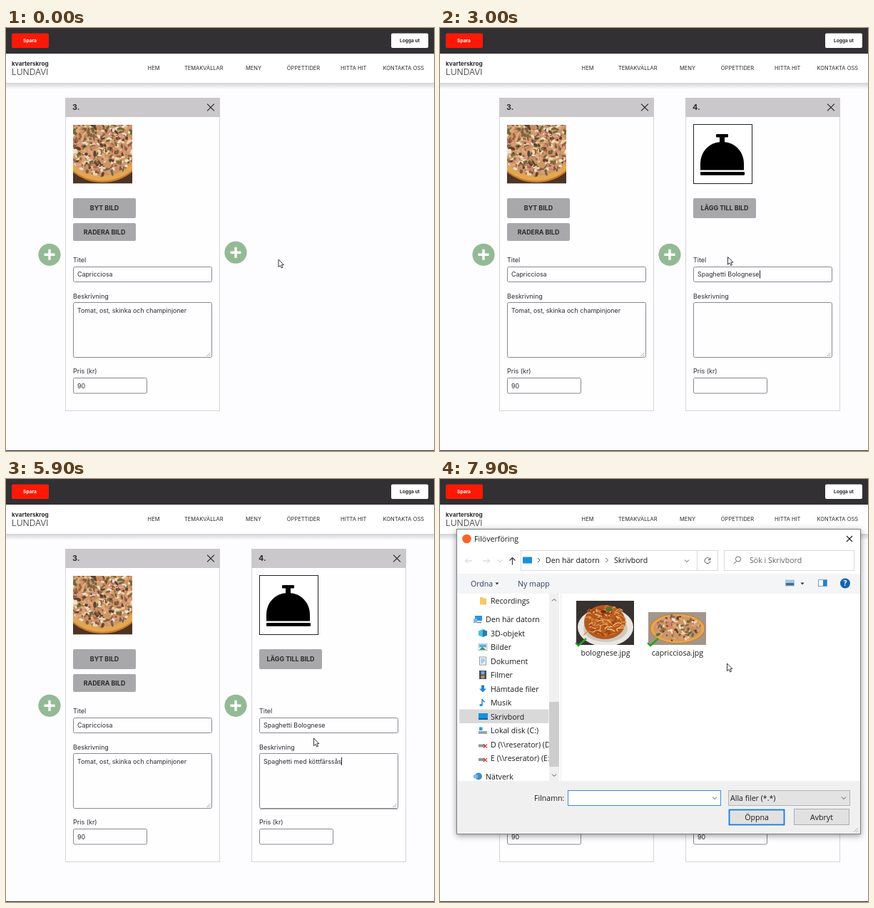
These frames come from a looping animation (600 by 594 pixels, 8 s). An HTML page:

```html
<!DOCTYPE html>
<html lang="sv">
<head>
<meta charset="utf-8">
<style>
  html, body { margin: 0; width: 100%; height: 100%; overflow: hidden; background: #fdfcfe; }
  svg { display: block; }
  text { font: 8.85px Inter, sans-serif; fill: #2b2a2e; white-space: pre; }
  .label { font-size: 9px; }
  .nav { font-size: 7.5px; }
  .button { font-size: 8.9px; font-weight: 700; }
  .small { font-size: 6.6px; font-weight: 700; }
  .number { font-size: 10.8px; font-weight: 700; }
  .win { font: 10.6px "Open Sans", sans-serif; fill: #1c1c1c; }
  .mid { text-anchor: middle; }
  .lift { filter: drop-shadow(0 4px 4px rgba(0,0,0,.28)); }
  .dialog { filter: drop-shadow(0 2px 4px rgba(0,0,0,.4)); }
</style>
</head>
<body>
<svg id="stage" width="600" height="594" viewBox="0 0 600 594"></svg>
<script>
const LOOP = 8000;
const stage = document.getElementById('stage');
const $ = id => document.getElementById(id);

let seed = 7;
const rnd = (a = 1, b = 0) => {
  seed = (seed * 16807) % 2147483647;
  return b + (a - b) * seed / 2147483647;
};

const rect = (x, y, w, h, fill, extra = '') =>
  `<rect x="${x}" y="${y}" width="${w}" height="${h}" fill="${fill}" ${extra}/>`;
const box = (x, y, w, h, stroke, fill = '#fff', rx = 0) =>
  rect(x + .5, y + .5, w - 1, h - 1, fill, `stroke="${stroke}" rx="${rx}"`);
const text = (x, y, s, cls = '', extra = '') =>
  `<text x="${x}" y="${y}" class="${cls}" ${extra}>${s}</text>`;
const line = (d, color, width = 1) =>
  `<path d="${d}" fill="none" stroke="${color}" stroke-width="${width}"/>`;
const shape = (d, fill) => `<path d="${d}" fill="${fill}"/>`;
const ellipse = (x, y, rx, ry, fill, extra = '') =>
  `<ellipse cx="${x}" cy="${y}" rx="${rx}" ry="${ry}" fill="${fill}" ${extra}/>`;
const cross = (x, y, r, color) =>
  line(`M${x - r} ${y - r}l${2 * r} ${2 * r}m0 ${-2 * r}l${-2 * r} ${2 * r}`, color, 1.1);
const chevron = (x, y, turn, color = '#555') =>
  `<g transform="translate(${x} ${y}) rotate(${turn})">${line('M-3 -1.5L0 1.5L3 -1.5', color)}</g>`;
const triangle = (x, y) => shape(`M${x - 2.5} ${y - 1.5}h5l-2.5 3z`, '#333');

function photo(x, y, w, h, back, content) {
  return `<svg x="${x}" y="${y}" width="${w}" height="${h}" viewBox="0 0 ${w} ${h}">
    ${rect(0, 0, w, h, back)}${content}</svg>`;
}

function pizza(cx, cy, rx, ry, count, size) {
  const tones = ['#ecd3b0', '#5d4030', '#cf8468', '#f1e1cb', '#9c6244', '#dcae78', '#7d5d49', '#d99a80', '#6d6a3a'];
  let s = ellipse(cx, cy, rx, ry, '#c47a2c') + ellipse(cx, cy, rx * .97, ry * .96, '#e3a652') +
    ellipse(cx, cy, rx * .86, ry * .83, '#cd9663');
  for (let i = 0; i < count; i++) {
    const a = rnd(6.28), r = Math.sqrt(rnd()) * .82;
    const px = cx + Math.cos(a) * r * rx, py = cy + Math.sin(a) * r * ry;
    s += ellipse(px, py, rnd(size, size / 3), rnd(size / 2, size / 4), tones[i % tones.length],
      `transform="rotate(${rnd(180)} ${px} ${py})"`);
  }
  return s;
}

function pasta() {
  const tones = ['#c96a24', '#eaa75a', '#8f3a16', '#f3c27c', '#d98238'];
  let s = ellipse(41, 37, 39, 27, '#e9e6e1') + ellipse(41, 39, 31, 19, '#cfc8bf') + ellipse(40, 30, 29, 24, '#b4581f');
  for (let i = 0; i < 90; i++) {
    const a = rnd(6.28), r = Math.sqrt(rnd()) * 21;
    s += line(`M${40 + Math.cos(a) * r * 1.2} ${30 + Math.sin(a) * r}q${rnd(9, -9)} ${rnd(-8)} ${rnd(13, -13)} ${rnd(5, -5)}`,
      tones[i % tones.length], 1.3);
  }
  return s + ellipse(46, 12, 5, 3, '#55702c') + ellipse(38, 15, 4, 2, '#6b2a14');
}

const bell = box(94, 135, 83, 84, '#222') +
  rect(126, 149, 17, 4.5, '#000', 'rx="1"') + rect(131, 152, 7, 9, '#000') +
  shape('M104 199.5V191C104 173 117 160 134.5 160S165 173 165 191V199.5z', '#000') +
  rect(104, 202, 62, 4.7, '#000', 'rx="1"');

const button = (y, h, label) =>
  rect(94, y, 88, h, '#a8a7a9', 'rx="2"') + text(138, y + h / 2 + 3.2, label, 'button mid');
const field = (y, w, h) => box(94, y, w, h, '#89888e', '#fefdff', 2);
const plus = (x, id) => `<g id="${id}" transform="translate(${x} 318.3)">
  ${ellipse(0, 0, 15.6, 15.6, '#93ba95')}${line('M-7.5 0H7.5M0 -7.5V7.5', '#fff', 3.4)}</g>`;

const card = (number, picture, buttons) =>
  box(83, 98, 217, 440, '#d6d4da', '#fefdff') + rect(83, 98, 217, 27, '#cac8cb') +
  text(93, 115.3, number, 'number') + cross(287, 111.5, 4.9, '#222') + picture + buttons +
  text(94, 329, 'Titel', 'label') + field(335, 195, 22) +
  text(94, 379.7, 'Beskrivning', 'label') + field(385, 195, 78) +
  line('M281.5 461l5 -5M284.5 461l2 -2', '#888', .8) +
  text(94, 485.2, 'Pris (kr)', 'label') + field(491, 104, 22.5);

// Each icon fills about 12 by 10 pixels around the middle of its left edge
const icons = {
  folder: () => shape('M2 -5h4l1 1.5h4v9h-9z', '#f3c969'),
  computer: () => rect(2, -5, 10, 7, '#2f93dc') + rect(0, -1, 5, 6, '#7fb9e4') + rect(5, 4, 6, 1.2, '#6a7c88'),
  cube: () => shape('M0 -3l6 -2.5v11l-6 -2.5z', '#48bde0') + shape('M6 -5.5l6 2.5v6l-6 2.5z', '#1c7fae'),
  picture: () => rect(0, -4.5, 12, 9.5, '#fff', 'stroke="#9ab" stroke-width=".7"') + rect(1, -3.5, 10, 4, '#58aee4') + shape('M1 4l4 -4l6 4z', '#3f8a64'),
  paper: () => box(1, -6, 10, 12, '#8a9aa6') + line('M3 -2.5h6m-6 2.5h6m-6 2.5h4', '#4b86b4'),
  film: () => rect(1, -6, 10, 12, '#444b55') + rect(3.5, -5, 5, 4.5, '#6fa6d4') + rect(3.5, .8, 5, 4.5, '#b98a5c'),
  download: () => shape('M4 -5h4v5h3l-5 5l-5 -5h3z', '#1f86d8'),
  note: () => line('M5 3v-8q1 3 4 4', '#2a8ee0', 1.5) + ellipse(3.6, 3.5, 2.3, 1.8, '#2a8ee0'),
  desktop: () => rect(0, -4.5, 13, 9, '#1690e0') + rect(0, 2.5, 13, 2, '#0d63a5'),
  disk: () => rect(0, 1, 12, 4, '#9aa4ab') + rect(1, -4.5, 4.5, 4.5, '#2a9ae0'),
  offline: () => rect(0, 0, 9, 4, '#8f979c') + cross(9.5, 2.5, 2.6, '#e02020'),
  network: () => ellipse(7, 0, 5, 5, '#3c8fd0') + rect(0, -2, 6, 4.5, '#7db8e4')
};

function sidebar() {
  const rows = [
    [171, 71, 'Recordings', 'folder'], [197, 64, 'Den här datorn', 'computer'],
    [216.5, 71, '3D-objekt', 'cube'], [236, 71, 'Bilder', 'picture'],
    [255.5, 71, 'Dokument', 'paper'], [275, 71, 'Filmer', 'film'],
    [294.5, 71, 'Hämtade filer', 'download'], [314, 71, 'Musik', 'note'],
    [333.5, 71, 'Skrivbord', 'desktop'], [353, 71, 'Lokal disk (C:)', 'disk'],
    [372.5, 71, 'D (\\\\reserator) (D:)', 'offline'], [392, 71, 'E (\\\\reserator) (E:)', 'offline'],
    [417.5, 64, 'Nätverk', 'network']];
  return `<clipPath id="side"><path d="M24 161H152.5V424H24z"/></clipPath><g clip-path="url(#side)">` +
    rect(27, 323.5, 126, 19.5, '#d9d9d9') +
    rows.map(([y, x, name, icon]) =>
      `<g transform="translate(${x - 17} ${y})">${icons[icon]()}</g>` + text(x, y + 4, name, 'win')).join('') +
    '</g>' + rect(153, 161, 14, 263, '#f0f0f0') + rect(153, 313, 14, 91, '#cdcdcd') +
    chevron(160, 170, 180) + chevron(160, 416, 0) + rect(169, 161, 1, 263, '#ececec');
}

function file(x, y, h, name, content, back) {
  return photo(x, y, 81, h, back, content) +
    line(`M${x - 1} 230l4 4l11 -10`, '#27a327', 2.4) + text(x + 41, 248, name, 'win mid');
}

const dialog = `<g id="dialog"><g class="dialog">${box(23, 70, 567, 429, '#7c7f83')}</g>` +
  ellipse(37.5, 84, 6.3, 6.3, '#f4662a') + text(48, 87.7, 'Filöverföring', 'win') + cross(574, 84, 4, '#222') +
  line('M45 115H35.5M39 111.5L35.5 115L39 118.5M60 115H69.5M66 111.5L69.5 115L66 118.5', '#ccc') +
  chevron(84, 115, 0, '#bbb') + line('M101.5 120.5V110.5M97.5 114.5L101.5 110.5L105.5 114.5', '#444', 1.3) +
  box(113, 100, 277, 29, '#d9d9d9') + rect(360, 100, 1, 28, '#d9d9d9') +
  rect(116, 109.5, 13, 9, '#1690e0') + chevron(138.5, 114, -90) + text(148, 118, 'Den här datorn', 'win') +
  chevron(234, 114, -90) + text(244, 118, 'Skrivbord', 'win') + chevron(346, 115, 0) +
  line('M378.5 112.5A4 4 0 1 0 379 115.5M379 110.5V113.5H376', '#555') +
  box(398, 100, 183, 29, '#d9d9d9') + ellipse(418, 112.5, 3.6, 3.6, 'none', 'stroke="#666"') +
  line('M415.5 115.5L411.5 119.5', '#666') + text(434, 118, 'Sök i Skrivbord', 'win', 'style="fill:#666"') +
  rect(24, 133, 565, 28, '#f4f5f7') + text(43, 151, 'Ordna', 'win', 'style="fill:#2b3d5c"') + triangle(80, 147) +
  text(109, 151, 'Ny mapp', 'win', 'style="fill:#2b3d5c"') +
  rect(484, 141.5, 13, 9, '#9cc9e8') + rect(485, 146, 11, 3.5, '#4a6a80') + triangle(508, 147) +
  box(530, 141, 13, 10, '#6f9fcf') + rect(537, 142, 5, 8, '#2a7fd0') +
  ellipse(568, 146.5, 7, 7, '#0f63b4') + text(568, 150, '?', 'win mid', 'style="fill:#fff;font-weight:700"') +
  sidebar() +
  file(191, 171, 62, 'bolognese.jpg', pasta(), '#37322f') +
  file(292, 187, 46, 'capricciosa.jpg', pizza(41, 23, 39, 21, 110, 4), '#a3958a') +
  rect(24, 424, 565, 74, '#f0f0f0') + text(132, 452, 'Filnamn:', 'win') +
  box(179, 437, 215, 22, '#3c8ad6') + chevron(385, 448, 0) +
  box(404, 437, 171, 22, '#b5b5b5', '#e3e3e3') + text(407, 452, 'Alla filer (*.*)', 'win') + chevron(566, 448, 0) +
  rect(405.5, 464.5, 77, 21, '#e1e1e1', 'stroke="#1a7bd0" stroke-width="1.8"') + text(444, 479, 'Öppna', 'win mid') +
  box(496, 463, 78, 23, '#adadad', '#e1e1e1') + text(535, 479, 'Avbryt', 'win mid') +
  line('M580 496l6 -6M583.5 496l2.5 -2.5', '#aaa') + '</g>';

const menu = [[207, 'HEM'], [277.3, 'TEMAKVÄLLAR'], [347, 'MENY'], [417, 'ÖPPETTIDER'], [487.3, 'HITTA HIT'], [557.3, 'KONTAKTA OSS']];

stage.innerHTML =
  rect(0, 0, 600, 594, '#fdfcfe') +
  `<linearGradient id="fade" x2="0" y2="1"><stop stop-color="#d3d2d5"/><stop offset="1" stop-color="#fdfcfe"/></linearGradient>` +
  rect(0, 77, 600, 9, 'url(#fade)') + rect(0, 36, 600, 41, '#fff') + rect(0, 0, 600, 36, '#323033') +
  rect(8, 7.5, 52, 20.4, '#ff1905', 'rx="2"') + text(33.5, 20, 'Spara', 'small mid', 'style="fill:#fff"') +
  rect(540, 7.5, 52, 20.4, '#fff', 'rx="2"') + text(566, 20, 'Logga ut', 'small mid') +
  text(8, 53, 'kvarterskrog', '', 'style="font-size:8.2px;font-weight:700"') +
  text(8, 65.5, 'LUNDAVI', '', 'style="font-size:12px;font-weight:300"') +
  menu.map(([x, s]) => text(x, 59.2, s, 'nav mid')).join('') +
  rect(0, 593, 600, 1, '#2a2a2c') +
  card('3.', photo(94, 136, 83, 82.5, '#4f3324', pizza(41, 24, 62, 57, 620, 4.5)),
    button(239, 28, 'BYT BILD') + button(274, 25, 'RADERA BILD')) +
  text(100, 349, 'Capricciosa') + text(100, 399.5, 'Tomat, ost, skinka och champinjoner') + text(100, 505.5, '90') +
  plus(61, 'plusLeft') + plus(322, 'plusRight') +
  `<g id="newCard"><g transform="translate(261 0)">${card('4.', bell,
    `<g id="hover" class="lift">${rect(94, 239, 88, 28, '#a8a7a9', 'rx="2"')}</g>` + button(239, 28, 'LÄGG TILL BILD'))}</g>
    ${rect(0, 0, 0, 1, '#a9a8ad', 'id="focus"')}
    ${text(361, 349, '', '', 'id="title"')}${text(361, 399.5, '', '', 'id="desc"')}${text(361, 505.5, '', '', 'id="price"')}
    ${rect(0, 0, 1, 11, '#222', 'id="caret"')}</g>` +
  dialog +
  `<g id="pointer"><path id="arrow" d="M0 0V10.6L2.5 8.4L4.2 12L6 11.2L4.3 7.6H7.4z" fill="#fff" stroke="#222" stroke-width=".9"/>
    <path id="beam" d="M-2.5 -5H-.5L0 -4.5L.5 -5H2.5M0 -4.5V4.5M-2.5 5H-.5L0 4.5L.5 5H2.5" fill="none" stroke="#222" stroke-width=".9"/></g>`;

// Keystrokes: time, field, its text, start of the caret blink
const keys = [];
const press = (time, id, value, blink = time) => keys.push({ time, id, value, blink });
const type = (start, step, id, value, from = 0) => {
  for (let n = from + 1; n <= value.length; n++) press(start + (n - from - 1) * step, id, value.slice(0, n));
};
press(1000, 'title', '');
type(1620, 66, 'title', 'Spaghetti Bolognese');
press(3400, 'desc', '');
type(3530, 45, 'desc', 'Spagett');
press(3900, 'desc', 'Spaget');
press(3945, 'desc', 'Spage');
press(3990, 'desc', 'Spag');
type(4550, 52, 'desc', 'Spaghetti med köttfärssås', 4);
press(6400, 'price', '', 6100);
press(6800, 'price', '9');
press(6950, 'price', '90');
press(7450, '', '');

const caretTop = { title: 340.5, desc: 391, price: 497 };
const focusLine = { desc: [463, 193], price: [514, 102] };
const path = [[0, 382, 325], [500, 394, 338], [1000, 394, 338], [1300, 403.5, 321.5], [3050, 403.5, 321.5],
  [3250, 424, 405], [3400, 424, 405], [3590, 431.5, 364], [7000, 431.5, 364], [7350, 402.5, 259], [LOOP, 402.5, 259]];

const clamp = v => Math.max(0, Math.min(1, v));
const ease = v => v * v * (3 - 2 * v);
const set = (id, attrs) => { for (const k in attrs) $(id).setAttribute(k, attrs[k]); };
const show = (id, on) => set(id, { visibility: on ? 'visible' : 'hidden' });

function pointerAt(t) {
  const i = path.findIndex(p => p[0] > t), a = path[i - 1], b = path[i];
  const k = ease((t - a[0]) / (b[0] - a[0]));
  return [a[1] + (b[1] - a[1]) * k, a[2] + (b[2] - a[2]) * k];
}

function draw(t) {
  const added = t >= 200, open = t >= 7700;
  set('newCard', { display: added ? 'inline' : 'none' });
  set('plusRight', { transform: `translate(322 ${315.2 + 3.1 * ease(clamp((t - 50) / 150))})` });
  set('dialog', { display: open ? 'inline' : 'none' });
  set('hover', { opacity: clamp((t - 7280) / 200) });

  const values = { title: '', desc: '', price: '' };
  let last = { id: '' };
  for (const key of keys) if (key.time <= t) {
    last = key;
    if (key.id) values[key.id] = key.value;
  }
  for (const id in values) if ($(id).textContent !== values[id]) $(id).textContent = values[id];

  const caretOn = last.id && (t - last.blink) % 1000 < 500;
  show('caret', caretOn);
  if (caretOn) set('caret', { x: 361 + Math.round($(last.id).getComputedTextLength()), y: caretTop[last.id] });
  const [y, width] = focusLine[last.id] || [0, 0];
  set('focus', { x: 356, y, width });

  const [px, py] = pointerAt(t);
  const inField = added && !open && px > 355 && px < 550 && (py > 335 && py < 357 || py > 385 && py < 463);
  set('pointer', { transform: `translate(${px} ${py})` });
  show('arrow', !inField);
  show('beam', inField);
}

function tick() {
  draw(performance.now() % LOOP);
  requestAnimationFrame(tick);
}
tick();
</script>
</body>
</html>
```
